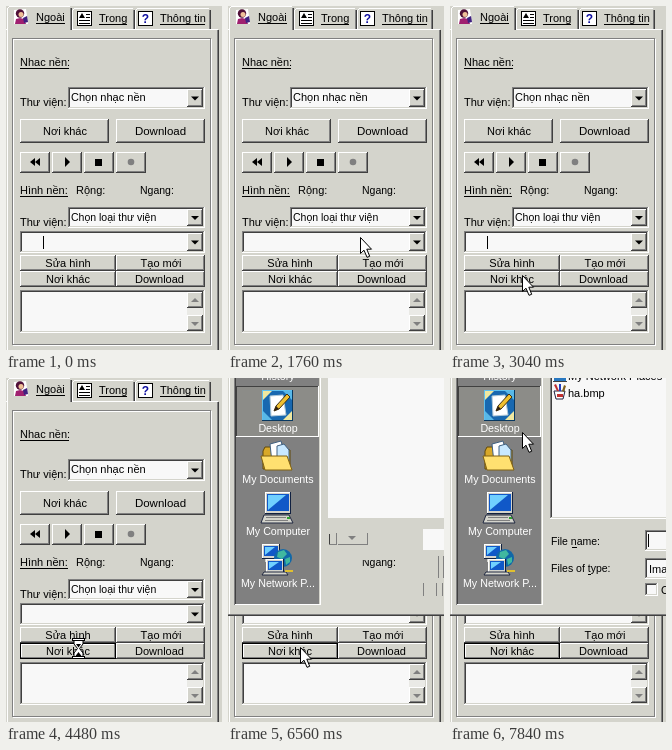
An HTML page that plays this animation: 216 px wide and 344 px high, repeating every 8 s.

```html
<!DOCTYPE html>
<html lang="vi">
<head>
<meta charset="utf-8">
<title>Settings panel</title>
<style>
  html, body { margin: 0; width: 100%; height: 100%; overflow: hidden; background: #d4d4cc; }
  svg { display: block; width: 216px; height: 344px; }
  text { font-family: "Liberation Sans", Arial, sans-serif; font-size: 11px; white-space: pre; }
  rect, line { shape-rendering: crispEdges; }
</style>
</head>
<body>
<svg id="stage" viewBox="0 0 216 344"></svg>
<script>
const FACE = '#d4d4cc', FIELD = '#f8f8f8', GREY = '#808080', DARK = '#404040', WHITE = '#fff', BLACK = '#000';

// drawing helpers
const box = (x, y, w, h, fill) => `<rect x="${x}" y="${y}" width="${w}" height="${h}" fill="${fill}"/>`;
const poly = (pts, fill, stroke = 'none') => `<polygon points="${pts}" fill="${fill}" stroke="${stroke}"/>`;
const disc = (x, y, r, fill) => `<circle cx="${x}" cy="${y}" r="${r}" fill="${fill}"/>`;
const text = (x, y, s, { size = 11, fill = BLACK, mid = false } = {}) =>
  `<text x="${x}" y="${y}" fill="${fill}" style="font-size:${size}px"${mid ? ' text-anchor="middle"' : ''}>${s}</text>`;
const group = (id, body) => `<g id="${id}">${body}</g>`;
const at = (x, y, body) => `<g transform="translate(${x} ${y})">${body}</g>`;

const edge = (x, y, w, h, a, b) =>
  box(x, y, w, 1, a) + box(x, y, 1, h, a) + box(x, y + h - 1, w, 1, b) + box(x + w - 1, y, 1, h, b);
const button = (x, y, w, h) =>
  box(x, y, w, h, FACE) + edge(x + 1, y + 1, w - 2, h - 2, FACE, GREY) + edge(x, y, w, h, WHITE, DARK);
const sunken = (x, y, w, h) =>
  box(x, y, w, h, FIELD) + edge(x + 1, y + 1, w - 2, h - 2, DARK, FACE) + edge(x, y, w, h, GREY, WHITE);
const etched = (x, y, w, h) =>
  edge(x + 1, y + 1, w, h, WHITE, WHITE) + edge(x, y, w, h, GREY, GREY);
const arrow = (x, y, dir, fill) => poly(`${x - 4},${y} ${x + 4},${y} ${x},${y + 4 * dir}`, fill);
const under = (x, y, w) => box(x, y, w, 1, BLACK);

const combo = (x, y, w, h) =>
  sunken(x, y, w, h) + button(x + w - 18, y + 2, 16, h - 4) + arrow(x + w - 10, y + h / 2 - 1.5, 1, BLACK);
const tab = (x, y, w, h) =>
  box(x, y + 1, w, h, FACE) + box(x + 2, y, w - 4, 1, WHITE) + box(x, y + 2, 1, h - 2, WHITE) +
  box(x + 1, y + 1, 1, 1, WHITE) + box(x + w - 2, y + 2, 1, h - 2, GREY) + box(x + w - 1, y + 2, 1, h - 2, DARK);

function tabs() {
  const person = poly('8,4 20,3 22,18 8,18', WHITE) + disc(14, 7.5, 4.2, '#501038') + disc(15, 8.5, 2.5, '#f0c098') +
    poly('9,18 10,13 14,12 18,13 20,18', '#a02070') + poly('17,12 21,10 22,16 18,17', '#402080');
  const page = box(71, 5, 15, 15, WHITE) + edge(71, 5, 15, 15, BLACK, BLACK) +
    poly('73,12 76,7 79,12', BLACK) + box(80, 8, 4, 1, BLACK) + box(80, 11, 4, 1, BLACK) +
    box(73, 14, 11, 1, BLACK) + box(73, 17, 11, 1, BLACK);
  const help = box(132, 5, 15, 15, WHITE) + edge(132, 5, 15, 15, BLACK, BLACK) +
    `<g font-weight="bold">${text(139.5, 17, '?', { size: 12, fill: '#1010a0', mid: true })}</g>`;
  return tab(66, 2, 63, 21) + tab(129, 2, 76, 21) + box(0, 23, 212, 1, WHITE) + tab(1, 0, 65, 24) +
    box(1, 23, 1, 321, WHITE) + box(211, 24, 1, 320, GREY) + box(212, 24, 1, 320, DARK) +
    person + page + help +
    text(30, 15, 'Ngoài') + under(30, 17, 29) + text(93, 16, 'Trong') + under(93, 18, 28) +
    text(154, 16, 'Thông tin') + under(154, 18, 45);
}

function media() {
  const y = 156;
  return [14, 46, 78, 110].map(x => button(x, 146, 30, 21)).join('') +
    poly(`29,${y - 4} 29,${y + 4} 24,${y}`, BLACK) + poly(`34,${y - 4} 34,${y + 4} 29,${y}`, BLACK) +
    poly(`59,${y - 5} 59,${y + 5} 64,${y}`, BLACK) + box(89, 153, 7, 7, BLACK) + disc(125, y, 3.3, GREY);
}

function panel() {
  return box(0, 0, 216, 344, FACE) + tabs() + etched(6, 32, 199, 307) +
    text(14, 60, 'Nhac nền:') + under(14, 62, 49) + text(14, 100, 'Thư viện:') +
    combo(62, 81, 137, 22) + text(65, 95, 'Chọn nhạc nền') +
    button(14, 113, 89, 24) + text(59, 129, 'Nơi khác', { mid: true }) +
    button(110, 113, 89, 24) + text(154.5, 129, 'Download', { size: 11.5, mid: true }) +
    media() +
    text(14, 188, 'Hình nền:') + under(14, 190, 48) + text(70, 188, 'Rộng:') + text(134, 188, 'Ngang:', { size: 10.5 }) +
    text(14, 220, 'Thư viện:') + combo(62, 201, 137, 21) + text(65, 215, 'Chọn loại thư viện', { size: 10.5 }) +
    combo(14, 225, 185, 22) +
    button(14, 249, 96, 16) + text(62, 261, 'Sửa hình', { mid: true }) +
    button(110, 249, 89, 16) + text(155, 261, 'Tạo mới', { mid: true }) +
    button(14, 265, 96, 16) + text(62, 277, 'Nơi khác', { mid: true }) +
    button(110, 265, 89, 16) + text(153.5, 277, 'Download', { mid: true }) +
    sunken(14, 284, 185, 43) + box(181, 286, 16, 39, '#eaeae6') +
    button(181, 286, 16, 16) + arrow(189, 296, -1, GREY) + button(181, 309, 16, 16) + arrow(189, 316, 1, GREY);
}

// large shortcut icons, each within 32 x 32
const screen = (x, y, w, h) =>
  box(x, y, w, h, FACE) + edge(x, y, w, h, WHITE, '#102040') + box(x + 2, y + 2, w - 4, h - 5, '#1058c8') +
  poly(`${x + 3},${y + 3} ${x + w - 5},${y + 3} ${x + 3},${y + h - 4}`, '#70d0ff');
const icons = {
  desk: box(1, 0, 31, 31, '#1868b0') + edge(1, 0, 31, 31, '#60c0f0', '#083860') +
    poly('2,1 11,1 2,10', '#f0e8a0') + poly('31,21 31,30 22,30', '#f0e8a0') +
    poly('22,1 31,1 31,10', '#58b8e8') + poly('2,21 11,30 2,30', '#58b8e8') +
    poly('9,6 22,5 25,25 10,26', WHITE, '#b0c8d8') + poly('13,21 15,16 26,4 29,7 18,19', '#f0c030', '#403010') +
    poly('13,21 15,16 18,19', '#302010'),
  docs: poly('2,10 4,6 11,6 13,9 29,9 29,28 2,28', '#d8a828', '#604808') +
    poly('9,3 20,0 25,18 11,22', WHITE, '#406080') + poly('16,5 23,3 28,9 28,20 16,20', '#c8e8ff', '#406080') +
    poly('0,15 26,15 31,29 4,29', '#ffe070', '#806010'),
  computer: screen(4, 0, 26, 22) + poly('3,23 28,23 32,31 0,31', FACE, '#202840') +
    box(5, 25, 20, 1, GREY) + box(4, 28, 23, 1, GREY) + box(26, 25, 3, 2, '#30a030'),
  network: screen(1, 0, 18, 15) + box(4, 15, 11, 3, FACE) + disc(22, 14, 9, '#1068a8') +
    poly('17,8 23,6 26,10 21,15 16,13', '#40b8a0') + poly('24,15 29,13 29,18 25,21', '#40b8a0') +
    screen(5, 15, 18, 14) + poly('3,28 25,28 27,31 1,31', FACE, '#202840') + box(24, 26, 8, 2, '#e0c030')
};
const places = [
  ['Desktop', 'desk', 12, 54], ['My Documents', 'docs', 63, 105],
  ['My Computer', 'computer', 114, 157], ['My Network P...', 'network', 166, 209]
];

function sidebar() {
  const label = (y, s) => text(50, y, s, { size: 10.7, fill: WHITE, mid: true });
  return box(0, 0, 216, 238, FACE) + box(1, 0, 1, 236, WHITE) + box(0, 236, 216, 1, GREY) + box(0, 237, 216, 1, DARK) +
    box(6, 0, 1, 227, GREY) + box(7, 0, 85, 226, GREY) + box(7, 0, 1, 226, DARK) +
    box(91, 0, 1, 227, FACE) + box(92, 0, 1, 227, WHITE) + box(7, 226, 86, 1, WHITE) +
    label(2, 'History') + box(8, 8, 83, 50, '#8c8c88') + edge(8, 8, 83, 51, DARK, WHITE) +
    places.map(([name, icon, y, base]) => at(33, y, icons[icon]) + label(base, name)).join('');
}

// half-painted right side of the dialog
const remnants = () =>
  box(100, 0, 116, 140, FIELD) +
  box(101, 156, 1, 11, DARK) + box(101, 166, 8, 1, GREY) + box(108, 155, 1, 12, GREY) +
  box(110, 155, 30, 12, FACE) + edge(110, 155, 30, 12, FACE, GREY) + arrow(124, 158, 1, GREY) +
  box(195, 151, 21, 21, FIELD) +
  text(134, 188, 'Ngang:', { size: 10.5 }) + box(133, 176, 40, 6, FACE) +
  box(210, 178, 1, 22, GREY) + box(215, 178, 1, 22, GREY);

function files() {
  const net = box(104, 0, 12, 4, '#2878c0') + box(103, 3, 14, 1, DARK);
  const paint = poly('104,13 115,13 113,21 106,21', WHITE, '#202040') + box(107, 16, 6, 3, '#c03030') +
    poly('104,7 106,6 109,13 107,13', '#c03030') + poly('109,6 111,6 111,13 109,13', '#2040c0') +
    poly('114,7 116,8 114,14 112,13', '#806020');
  return box(100, 0, 116, 200, FACE) + box(100, 0, 116, 140, FIELD) + box(100, 0, 1, 140, GREY) +
    box(101, 0, 1, 139, DARK) + box(101, 139, 115, 1, FACE) + box(100, 140, 116, 1, WHITE) +
    net + paint + text(118, 2, 'My Network Places') + text(118, 19, 'ha.bmp') +
    text(101, 167, 'File name:', { size: 10.5 }) + under(122, 169, 5) +
    text(101, 194, 'Files of type:', { size: 10.5 }) + under(138, 196, 3) +
    sunken(195, 152, 140, 21) + sunken(195, 180, 140, 21) + text(199, 195, 'Images');
}

const checkbox = sunken(195, 205, 13, 13) + text(211, 216, 'Open as read-only');
const hover = (id, y, h) => group(id, edge(8, y, 83, h, WHITE, DARK));
const pointer = poly('.5,.5 .5,16.5 4,13.2 7,20.3 9.7,19.3 6.8,12.2 11.5,12.2', WHITE, BLACK);
const hourglass = poly('2,2 11,2 11,6 7.5,10.5 11,15 11,19 2,19 2,15 5.5,10.5 2,6', WHITE, BLACK) +
  box(0, 0, 13, 3, BLACK) + box(1, 1, 11, 1, WHITE) + box(0, 18, 13, 3, BLACK) + box(1, 19, 11, 1, WHITE) +
  poly('4,6 9,6 6.5,9.5', BLACK) + poly('3.5,18 9.5,18 6.5,14', BLACK);

document.getElementById('stage').innerHTML = panel() +
  group('caret', box(37, 230, 1, 13, BLACK)) +
  group('frame', edge(15, 266, 94, 14, WHITE, GREY) + edge(14, 265, 96, 16, BLACK, BLACK)) +
  group('focus', `<rect x="18.5" y="269.5" width="88" height="8" fill="none" stroke="${GREY}" stroke-dasharray="1 1"/>`) +
  group('blank', box(14, 225, 185, 13, FIELD)) +
  group('dialog', sidebar()) + group('remnants', remnants()) + group('files', files()) +
  group('stubs', [195, 208, 214].map(x => box(x, 205, 1, 13, GREY)).join('')) +
  group('check', checkbox) + group('nameCaret', box(198, 156, 1, 13, BLACK)) +
  hover('hoverDocs', 60, 50) + hover('hoverComputer', 111, 51) + hover('hoverNetwork', 163, 51) +
  group('wait', at(66, 260, hourglass)) + group('pointer', pointer);

const LOOP = 8000;
// [start, end] spans in ms during which each layer is shown
const spans = {
  caret: [[0, 320], [960, 1440], [1920, 2400], [2880, 3360]],
  focus: [[3360, 4320]],
  frame: [[3520, LOOP]],
  wait: [[4480, 6400]],
  blank: [[6400, 6560]],
  dialog: [[6560, LOOP]],
  remnants: [[6560, 6720]],
  files: [[6720, LOOP]],
  stubs: [[6560, 6880]],
  check: [[6880, LOOP]],
  nameCaret: [[6720, 7360], [7840, LOOP]],
  hoverNetwork: [[7360, 7520]],
  hoverComputer: [[7520, 7680]],
  hoverDocs: [[7680, 7840]],
  pointer: [[1440, 4480], [6400, LOOP]]
};
// pointer stops: time, x, y
const path = [
  [1440, 206, 235], [1600, 173, 233], [1760, 132, 231], [1920, 84, 231], [2080, 72, 231],
  [2400, 72, 233], [2560, 72, 249], [2720, 72, 264], [2880, 72, 268], [3040, 72, 269],
  [7360, 74, 200], [7520, 74, 143], [7680, 73, 92], [7840, 72, 54]
];

const el = id => document.getElementById(id);
const layers = Object.entries(spans).map(([id, list]) => [el(id), list]);
const cursor = el('pointer');

function draw(now) {
  const t = now % LOOP;
  for (const [node, list] of layers)
    node.style.display = list.some(([a, b]) => t >= a && t < b) ? '' : 'none';
  const [, x, y] = path.filter(p => p[0] <= t).pop() || path[0];
  cursor.setAttribute('transform', `translate(${x} ${y})`);
}

const start = performance.now();
function tick() {
  draw(performance.now() - start);
  requestAnimationFrame(tick);
}
tick();
</script>
</body>
</html>
```
